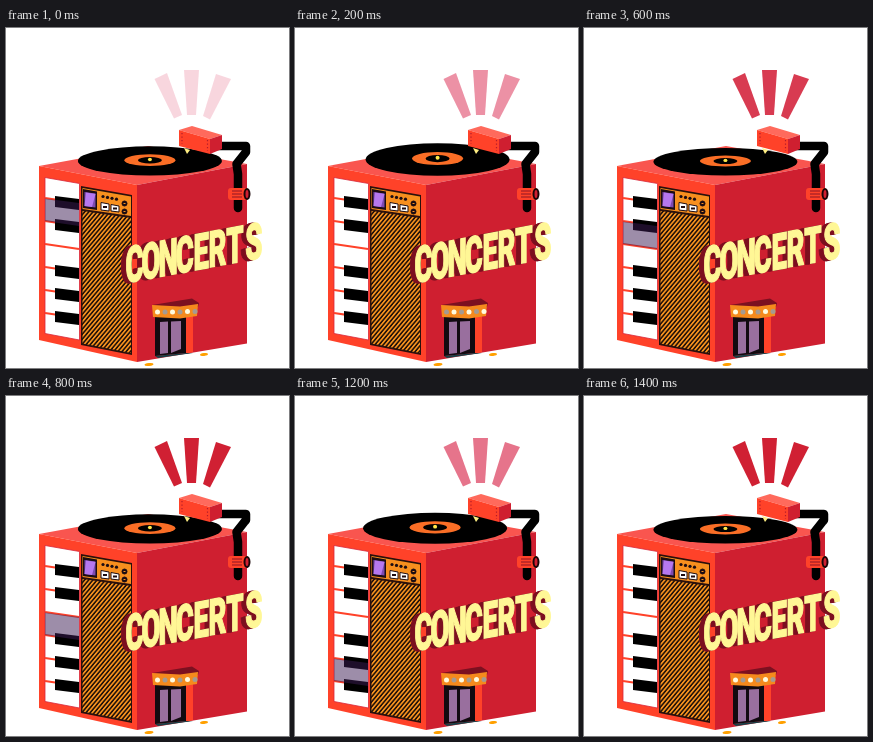
An HTML page for the animation above (1.6 s loop, 283 by 340 pixels).

```html
<!DOCTYPE html>
<html lang="en">
<head>
<meta charset="utf-8">
<title>Concerts</title>
<style>
html, body { margin: 0; width: 100%; height: 100%; overflow: hidden; background: #fff; }
svg { display: block; width: 283px; height: 340px; }
.sign { font: 900 50px Roboto, "Open Sans", sans-serif; text-anchor: middle; stroke-width: 1.5; }
</style>
</head>
<body>
<svg viewBox="0 0 283 340">
  <defs>
    <pattern id="grill" width="3.2" height="3.2" patternUnits="userSpaceOnUse" patternTransform="rotate(-50)">
      <rect width="3.2" height="3.2" fill="#160b08"/>
      <rect width="3.2" height="1.7" fill="#f7921e"/>
    </pattern>
  </defs>

  <g id="rays">
    <path d="M148.500 51L161 45L176 87L168 90.500Z"/>
    <path d="M178 42H193L190 87H181Z"/>
    <path d="M210 46L225 51L204 91.500L197 88Z"/>
  </g>

  <!-- building -->
  <path d="M33 138L142 118L241 136L131 157Z" fill="#f9554f"/>
  <path d="M33 138L131 157V334L33 312Z" fill="#ff4229"/>
  <path d="M131 157L241 136V315.500L131 334Z" fill="#cf1f30"/>

  <path d="M39 149.500L73.500 155.500V312L39 305.500Z" fill="#fff" stroke="#d8263a" stroke-width=".8"/>
  <g id="keys"></g>
  <path id="press" fill="#3c1c55" fill-opacity=".5"/>

  <!-- amplifier -->
  <path d="M75 158L126 167V327L75 317Z" fill="#2b100b"/>
  <path d="M76.500 160L125 168.500V188L76.500 181Z" fill="#f78f1e"/>
  <path d="M76.500 183L125 190V325L76.500 315.500Z" fill="url(#grill)"/>
  <path d="M77 161L91 163.500V182L77 180Z" fill="#1c0c12"/>
  <path d="M78.500 164L89.500 165.500V179.500L78.500 178Z" fill="#7d4bb0"/>
  <path d="M80 164.500L89.500 166L86 179L78.500 178Z" fill="#b678ee"/>
  <g id="knobs" fill="#1c0c12"></g>
  <path d="M95 174.500L103 176V183L95 182ZM105 176.500L113 178V184L105 183Z" fill="#fff" stroke="#1c0c12"/>
  <path d="M97 179H101M107 180.500H111" stroke="#1c0c12" stroke-width="2"/>
  <g fill="#1c0c12" stroke="#1c0c12">
    <circle cx="118.500" cy="175.500" r="2.500"/><circle cx="118.500" cy="183.500" r="2.500"/>
  </g>
  <path d="M117.500 175.500H119.500M117.500 183.500H119.500" stroke="#f78f1e"/>

  <!-- record -->
  <g id="disc">
    <ellipse rx="72" ry="15"/>
    <ellipse cy="-.8" rx="25.500" ry="6" fill="#fa6e26"/>
    <ellipse cy="-.8" rx="12" ry="3.300"/>
    <ellipse cy="-1.500" rx="2" ry="1.800" fill="#ffe84a"/>
  </g>

  <!-- tone arm -->
  <path d="M211 118H240V124L230.500 136L232 146V180" fill="none" stroke="#000" stroke-width="8.500" stroke-linecap="round" stroke-linejoin="round"/>
  <path d="M178 120L184 122L181 126Z" fill="#ffef83"/>
  <path d="M173 102L186 98L216 107L204 111Z" fill="#ff6a5c"/>
  <path d="M173 102L204 111V126L173 118Z" fill="#ff4229"/>
  <path d="M204 111L216 107V121L204 126Z" fill="#cf1f30"/>
  <path d="M176 105V116M201.500 112V123" stroke="#b21b2a" stroke-width="1.200" stroke-dasharray="1.300 2.200"/>
  <rect x="222" y="160" width="20" height="12" rx="3" fill="#ff4229"/>
  <path d="M226 163H236M226 166H236M226 169H236" stroke="#8d1424"/>
  <ellipse cx="241" cy="166" rx="3.500" ry="6" fill="#1b0508"/>
  <ellipse cx="241" cy="166" rx="1.500" ry="4" fill="#cf1f30"/>

  <g id="sign"></g>

  <!-- entrance -->
  <path d="M180 288L187 285V324L180 326Z" fill="#ff4229"/>
  <path d="M149 289L180 288V325L149 328Z" fill="#120a10"/>
  <path d="M149 328L180 325L187 325L152 330Z" fill="#174047"/>
  <path d="M154 294L162 293.500V325L154 326ZM165 293.500L175 293V321L165 325Z" fill="#996f9e"/>
  <path d="M163.500 292V326" stroke="#120a10"/>
  <path d="M146 277L186 270.500L193 275L192 279L174 280Z" fill="#7c1020"/>
  <path d="M146 277L174 278.500L192 276L191 288L174 290.500L147 289Z" fill="#f58a1d"/>
  <g id="bulbs"></g>
  <g fill="#ffa000">
    <ellipse cx="143" cy="336.500" rx="4.500" ry="1.500" transform="rotate(-6 143 336.500)"/>
    <ellipse cx="198" cy="326.500" rx="4" ry="1.400" transform="rotate(-8 198 326.500)"/>
  </g>
</svg>
<script>
const $ = id => document.getElementById(id);
const keyTop = n => 147 + 23 * n;   // left end of the gap above key n

// the gap above key 3 carries no black key
$('keys').innerHTML = [1, 2, 3, 4, 5, 6].map(n => {
  const y = keyTop(n);
  const black = n == 3 ? '' : `<path d="M49 ${y - 2}L73 ${y + 1}V${y + 12}L49 ${y + 9}Z"/>`;
  return `<path d="M39 ${y}L73 ${y + 5}" stroke="#ff4229" stroke-width="2.2"/>` + black;
}).join('');

$('knobs').innerHTML = [0, 1, 2, 3].map(i =>
  `<circle cx="${97 + 4.5 * i}" cy="${168.5 + .9 * i}" r="1.6"/>`).join('');

const letters = (color, dx, dy) => `<text class="sign"
  transform="matrix(.55 -.103 0 1 ${120 + dx} ${255 + dy})" y="0"
  x="15.5 45.5 76.5 107 136.5 166.5 198 232.5" fill="${color}" stroke="${color}">CONCERTS</text>`;
$('sign').innerHTML =
  [-5, -3.5, -2].map(dx => letters('#7d1020', dx, -dx / 5)).join('') + letters('#fff796', 0, 0);

$('bulbs').innerHTML = [0, 1, 2, 3, 4, 5].map(i =>
  `<circle cx="${151.5 + 7.5 * i}" cy="${i < 4 ? 284 : 283.5}" r="2.5"/>`).join('');
const bulbs = [...$('bulbs').children];

const glow = [.18, .49, .7, .88, 1, .27, .62, 1];
const pressed = [1, 0, 0, 2, 3, 4, 5, 0];

function draw(now) {
  const step = Math.floor(now % 1600 / 200);

  const g = glow[step];
  $('rays').setAttribute('opacity', g);
  $('rays').setAttribute('fill', `rgb(${220 - 12 * g * g}, 32, ${80 - 29 * g * g})`);

  const n = pressed[step], y = keyTop(n);
  $('press').setAttribute('d', n ? `M39 ${y + .5}L73 ${y + 5}V${y + 28}L39 ${y + 23}Z` : '');

  // the record wobbles once every four steps
  const a = step * Math.PI / 2 - .3, tilt = Math.sin(a);
  $('disc').setAttribute('transform',
    `translate(${142 + 2 * Math.cos(a)} ${132.6 - tilt * 1.2}) scale(1 ${1 + .09 * tilt})`);

  const swap = step % 4 == 1;
  bulbs.forEach((b, i) => b.setAttribute('fill', (i % 2 == 1) != swap ? '#a59a91' : '#fffbe0'));
}

const start = performance.now();
function tick() {
  draw(performance.now() - start);
  requestAnimationFrame(tick);
}
draw(0);
requestAnimationFrame(tick);
</script>
</body>
</html>
```
